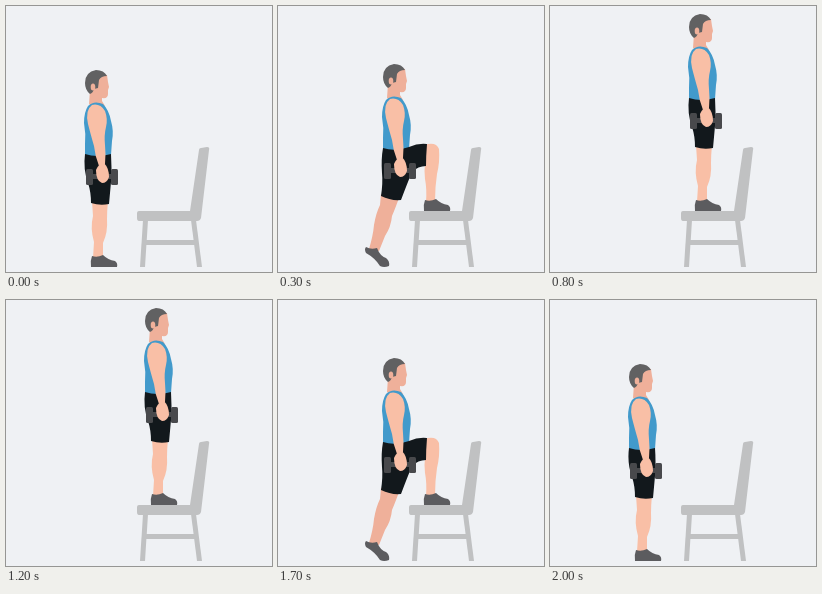
Write an HTML page that moves like this. It is 266 px wide and 266 px high and loops after 2.1 s.

```html
<!DOCTYPE html>
<html lang="en">
<head>
<meta charset="utf-8">
<title>Dumbbell step-up</title>
<style>
html, body { margin: 0; height: 100%; overflow: hidden; background: #eff1f4; }
svg { display: block; width: 100%; height: 100%; }
.skin { fill: #f9bfa6; }
.shade { fill: #efb09a; }
.hair { fill: #616162; }
.top { fill: #429acb; }
.shorts { fill: #12181c; }
.iron { fill: #48494c; }
.shoe { fill: #5c5c5f; }
.chair { fill: #c0c1c2; }
</style>
</head>
<body>
<svg viewBox="0 0 266 266">
  <defs>
    <g id="torso">
      <path class="shade" d="M84 84L83 98Q90 104 99 100L96 95L96 92Q102 93 102 88L102 84L103 81L102 76L101 69L92 67Z"/>
      <path class="hair" d="M101 70Q98 64 90 64Q79 66 79 77Q79 84 84 88Q87 87 88 83L92 82L93 74Q95 70 101 70Z"/>
      <ellipse class="shade" cx="87" cy="81" rx="2.3" ry="3.6"/>
      <path class="top" d="M82 100Q88 94 97 98Q103 104 105 115Q108 125 106 135L105 149Q91 153 79 150L79 138Q80 128 78 117Q78 106 82 100Z"/>
    </g>
    <g id="arm">
      <path class="skin" d="M86 99Q94 97 99 105Q102 113 100 121Q98 129 99 139Q100 148 99 158L93 160Q89 150 88 140Q84 126 82 118Q79 104 86 99Z"/>
      <rect class="iron" x="84" y="168" width="24" height="5"/>
      <rect class="iron" x="80" y="163" width="7" height="16" rx="1.5"/>
      <rect class="iron" x="105" y="163" width="7" height="16" rx="1.5"/>
      <path class="skin" d="M90 164Q93 157 98 157Q103 162 103 171Q101 177 96 177Q90 175 90 164Z"/>
    </g>
    <path id="shoe" class="shoe" d="M86 250Q91 252 97 249Q102 254 109 255Q112 257 111 261L85 261Q84 255 86 250Z"/>
    <g id="stand">
      <path class="skin" d="M86 195L102 195Q101 205 101 213Q102 226 97 237L97 251L87 252L88 236Q84 222 87 210Z"/>
      <use href="#shoe"/>
      <use href="#torso"/>
      <path class="shorts" d="M79 148Q91 152 105 148Q106 162 105 176L103 198Q94 200 85 197Q85 186 82 177Q77 163 79 148Z"/>
      <use href="#arm"/>
    </g>
    <g id="step">
      <path class="shade" d="M103 188L121 192Q117 203 114 210Q113 221 107 230L101 245L91 243Q95 230 96 219Q98 207 102 199Z"/>
      <path class="shoe" d="M88 241Q93 244 99 242Q102 250 108 252Q112 255 111 260Q106 262 102 260Q97 252 88 247Q86 243 88 241Z"/>
      <path class="skin" d="M146 139Q158 135 161 143Q162 156 159 168Q157 181 157 195L148 196Q149 183 147 173Q146 165 147 158Z"/>
      <use href="#shoe" x="61" y="-56"/>
      <use href="#torso" x="26" y="-6"/>
      <path class="shorts" d="M105 142Q117 146 131 141Q140 137 149 138Q148 150 148 160Q140 160 134 166Q129 178 123 194Q113 195 103 190Q105 177 104 167Q103 153 105 142Z"/>
      <use href="#arm" x="26" y="-6"/>
    </g>
  </defs>

  <g class="chair">
    <path d="M193 144Q193 142 195 142L201 141Q204 141 203 144L195 212Q194 215 191 215L133 215Q131 215 131 212L131 207Q131 205 133 205L184 205Z"/>
    <path d="M137 214L142 214L139 261L134 261Z"/>
    <path d="M185 214L190 214L196 261L191 261Z"/>
    <path d="M138 234H191V239H138Z"/>
  </g>
  <use id="figure" href="#stand"/>
</svg>
<script>
const LOOP = 2100;
const poses = [
  { until: 300, href: "#stand", x: 0, y: 0 },
  { until: 800, href: "#step", x: 0, y: 0 },
  { until: 1300, href: "#stand", x: 60, y: -56 },
  { until: 1800, href: "#step", x: 0, y: 0 },
  { until: LOOP, href: "#stand", x: 0, y: 0 }
];
const figure = document.getElementById("figure");
const start = performance.now();
let shown;

function draw() {
  const t = (performance.now() - start) % LOOP;
  const pose = poses.find(p => t < p.until);
  if (pose !== shown) {
    for (const key of ["href", "x", "y"]) figure.setAttribute(key, pose[key]);
    shown = pose;
  }
  requestAnimationFrame(draw);
}
draw();
</script>
</body>
</html>
```
